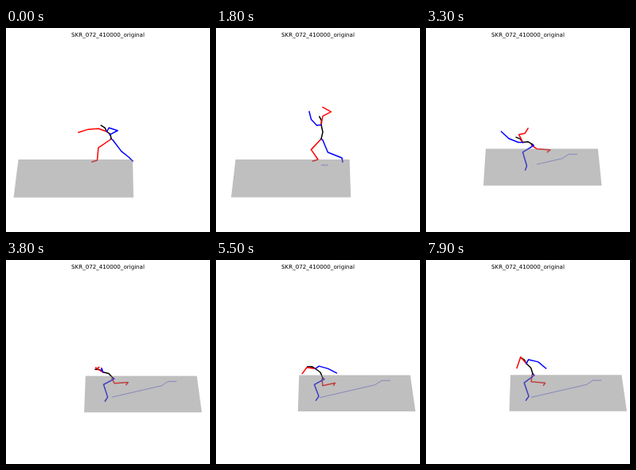
These frames come from a looping animation (256x256 px, 8 s). An HTML page:

```html
<!DOCTYPE html>
<html lang="en">
<head>
<meta charset="utf-8">
<title>Skeleton motion</title>
<style>
  html, body { margin: 0; width: 100%; height: 100%; overflow: hidden; background: #fff; }
  svg { display: block; width: 100vw; height: 100vh; }
  text { font: 7.1px "DejaVu Sans", sans-serif; text-anchor: middle; }
  polyline { fill: none; stroke-linejoin: round; stroke-linecap: square; }
</style>
</head>
<body>
<svg id="stage" viewBox="0 0 256 256">
  <text x="128" y="11">SKR_072_410000_original</text>
</svg>
<script>
const LOOP = 8000, STEP = 100;

// Key points: time, then a position or an angle in degrees.
const chest = [[0, 126.5, 130], [1800, 132, 121.5], [2600, 128.5, 126.5], [3300, 121.5, 143.5],
  [4400, 123, 137], [6600, 126, 136], [7900, 126, 130]];
const neckAngle = [[0, -133], [1800, -102], [2600, -120], [3300, -143], [4400, -173], [6600, -152], [7900, -135]];
const rightShoulder = [[0, -160], [1800, -80], [2600, -82], [3300, -117], [4400, -175], [6600, -162], [7900, -131]];
const leftShoulder = [[0, -60], [1800, -187], [3300, -180], [4400, -30], [7900, -63]];

// Hands and feet: time, position, and how far the elbow or knee bends out.
const rightHand = [[0, 91, 131, 1.5], [1800, 134, 99.5, 10.5], [2600, 137.5, 103, 8.5], [3300, 128, 126, 3],
  [4400, 107.5, 140, 0], [6600, 110, 143.5, 0], [7900, 114, 135.5, 0]];
const leftHand = [[0, 130, 134, -10.5], [1800, 117, 105, -2.6], [2600, 110.5, 110.5, -3.5],
  [3300, 94.5, 130, -2.4], [4400, 151.5, 143.5, -.6], [7900, 150.5, 136, -3]];
const rightFoot = [[0, 114.5, 166, 7.2], [1800, 128, 165, 10], [2600, 131.5, 163.5, 10],
  [3300, 156, 153, 3], [4400, 149.5, 154.3, 8]];
const leftFoot = [[0, 154, 162, 1.8], [1800, 158, 163, 6.9], [2600, 164, 160, 5.2],
  [3300, 126.5, 173, 10.4], [4400, 129, 171, 9.9]];

// Walked path in floor units (u across, v towards the viewer).
const path = [[.81, .15], [.737, .15], [.677, .266], [.19, .615]];

const lerp = (a, b, k) => a + (b - a) * k;
const clamp = k => Math.min(1, Math.max(0, k));
const smooth = k => (k = clamp(k)) * k * (3 - 2 * k);

// Monotone cubic interpolation: smooth, without overshoot.
function sample(keys, t) {
  const last = keys.length - 1;
  if (t >= keys[last][0]) return keys[last].slice(1);
  const i = keys.findLastIndex(key => key[0] <= t);
  const span = keys[i + 1][0] - keys[i][0], k = (t - keys[i][0]) / span;
  return keys[i].slice(1).map((a, column) => {
    const c = column + 1;
    const slope = n => (keys[n + 1][c] - keys[n][c]) / (keys[n + 1][0] - keys[n][0]);
    const tangent = n => {
      if (n === 0 || n === last) return 0;
      const p = slope(n - 1), q = slope(n);
      return p * q > 0 ? 2 * p * q / (p + q) : 0;
    };
    return lerp(a, keys[i + 1][c], smooth(k))
      + span * k * (1 - k) * (tangent(i) * (1 - k) - tangent(i + 1) * k);
  });
}

const offset = ([x, y], dx, dy) => [x + dx, y + dy];
function polar([x, y], radius, degrees) {
  const angle = degrees * Math.PI / 180;
  return [x + radius * Math.cos(angle), y + radius * Math.sin(angle)];
}

// The joint between two ends, pushed sideways by "bend".
function joint([x0, y0], [x1, y1], bend, along = .5) {
  const dx = x1 - x0, dy = y1 - y0, size = Math.hypot(dx, dy) || 1;
  return [lerp(x0, x1, along) - dy / size * bend, lerp(y0, y1, along) + dx / size * bend];
}

// The slow step forward, the leap, and the final straightening up.
const stepAt = t => clamp(t / 1800) ** 2;
const leapAt = t => 1 / (1 + Math.exp((3180 - t) / 220));
const riseAt = t => smooth((t - 6700) / 1200);
const panAt = t => .1 * stepAt(t) + .9 * leapAt(t);

function floorAt(t) {
  const pan = panAt(t), drift = smooth((t - 7100) / 800);
  const nearL = 9.5 + 93.3 * pan + 1.7 * drift;
  const farL = nearL + 6 - 4.5 * pan;
  const far = 165 - 20.5 * leapAt(t) ** .9 - .3 * drift;
  return {
    nearL, farL, far,
    nearR: nearL + 150.5 - 3 * pan,
    farR: farL + 143.5 - 4 * pan,
    near: far + 47.8 - 2.2 * pan
  };
}

function trailPoints(tip, floor) {
  const points = [path[0]];
  for (let i = 1; i < path.length; i++) {
    const [u0, v0] = path[i - 1], [u1, v1] = path[i];
    const k = clamp((tip - u0) / (u1 - u0));
    points.push([lerp(u0, u1, k), lerp(v0, v1, k)]);
    if (k < 1) break;
  }
  return points.map(([u, v]) => [
    lerp(lerp(floor.farL, floor.nearL, v), lerp(floor.farR, floor.nearR, v), u),
    lerp(floor.far, floor.near, v)
  ]);
}

function bodyAt(t) {
  const leap = leapAt(t), step = stepAt(t);
  const root = [132 + 2 * leap, 139 + 9 * leap ** .6 - 5 * riseAt(t)];
  const torso = sample(chest, t);
  const head = polar(torso, 10.5, sample(neckAngle, t)[0]);

  const arm = (keys, radius, angles) => {
    const shoulder = polar(torso, radius, sample(angles, t)[0]);
    const [x, y, bend] = sample(keys, t);
    return [torso, shoulder, joint(shoulder, [x, y], bend), [x, y]];
  };
  const leg = (keys, hip, along, toeX, toeY) => {
    const [x, y, bend] = sample(keys, t);
    return [root, hip, joint(hip, [x, y], bend, along), [x, y], [x + toeX, y + toeY]];
  };

  return {
    rightLeg: leg(rightFoot, offset(root, -1, 1), lerp(.55, .2, leap), 4.5 * leap - 6.5, 2 + leap),
    leftLeg: leg(leftFoot, offset(root, 2, 1.5), lerp(.6, .46, step), 5 - 4 * step - 4.5 * leap, 5),
    spine: [root, joint(root, torso, 2), torso, joint(torso, head, 1.5), head],
    rightArm: arm(rightHand, 11, rightShoulder),
    leftArm: arm(leftHand, 5.5, leftShoulder)
  };
}

const stage = document.getElementById("stage");
function add(tag, attributes) {
  const node = document.createElementNS("http://www.w3.org/2000/svg", tag);
  for (const name in attributes) node.setAttribute(name, attributes[name]);
  return stage.appendChild(node);
}
const line = (stroke, width = 1.5) => add("polyline", { stroke, "stroke-width": width });
const setPoints = (node, points) => node.setAttribute("points", points.join(" "));

const trail = line("blue", .45);
const limbs = {
  rightLeg: line("red"),
  leftLeg: line("blue"),
  spine: line("black"),
  rightArm: line("red"),
  leftArm: line("blue")
};
const ground = add("polygon", { fill: "#808080", "fill-opacity": .5 });

function draw(t) {
  const floor = floorAt(t);
  setPoints(ground, [floor.farL, floor.far, floor.farR, floor.far,
    floor.nearR, floor.near, floor.nearL, floor.near]);

  // The trail ends one step behind the body.
  const past = t - STEP;
  trail.style.display = past > 0 ? "" : "none";
  setPoints(trail, trailPoints(path[0][0] - .62 * panAt(past), floor));

  const body = bodyAt(t);
  for (const name in limbs) setPoints(limbs[name], body[name]);
}

const begin = performance.now();
function tick() {
  const t = (performance.now() - begin) % LOOP;
  draw(Math.floor(t / STEP) * STEP);
  requestAnimationFrame(tick);
}
tick();
</script>
</body>
</html>
```
